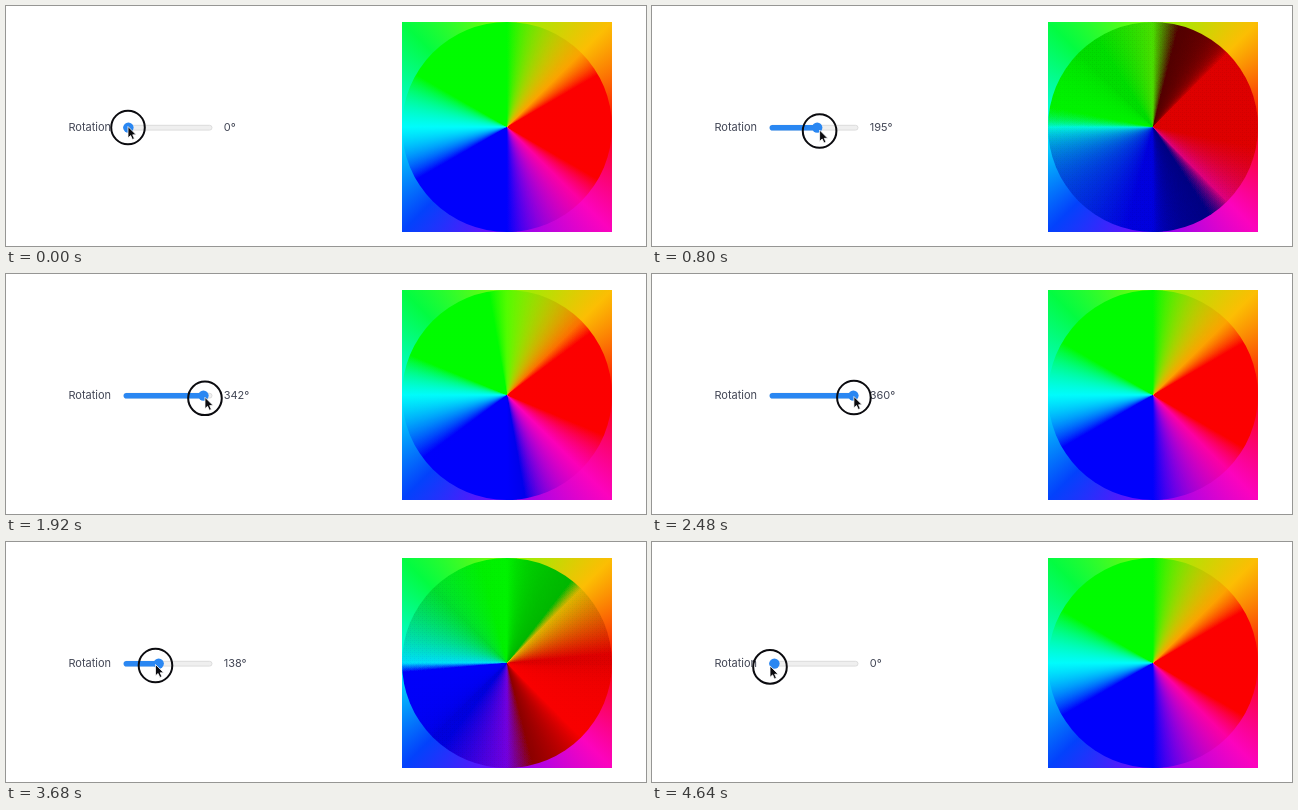
Animation of 640x240 px, one loop 4.72 s. Source, as an HTML page:

```html
<!DOCTYPE html>
<html lang="en">
<head>
<meta charset="utf-8">
<title>Hue rotation slider</title>
<style>
  html, body { margin: 0; width: 100%; height: 100%; overflow: hidden; background: #fff; }
  #panel { position: absolute; left: 0; top: 0; }
  #square { position: absolute; left: 396px; top: 16px; width: 210px; height: 210px; isolation: isolate; }
  #disc { position: absolute; inset: 0; border-radius: 50%; mix-blend-mode: color-burn; }
  text { font: 11px Inter, sans-serif; fill: #434756; }
</style>
</head>
<body>
<svg id="panel" width="640" height="240" viewBox="0 0 640 240">
  <text x="62.4" y="125.3">Rotation</text>
  <text id="value" x="217.7" y="125.3">0°</text>
  <rect x="118" y="119.3" width="88" height="4.8" rx="2.4" fill="#efefef" stroke="#d6d6d6" stroke-width=".8"/>
  <rect id="fill" x="117.6" y="118.9" height="5.6" rx="2.8" fill="#2a87f2"/>
  <circle id="thumb" cy="121.6" r="5.2" fill="#2a87f2"/>
  <g id="pointer">
    <circle r="16.8" fill="none" stroke="#0b0b0f" stroke-width="2"/>
    <path d="M0 -1V10.4L2.6 8L4.4 12L6.4 11.1L4.7 7.3H8.2Z" fill="#0b0b0f" stroke="#fff" stroke-width=".8"/>
  </g>
</svg>
<div id="square"><div id="disc"></div></div>
<script>
const LOOP = 4720, STEP = 80, TURN = 2480;
const el = id => document.getElementById(id);
const clamp = u => Math.min(1, Math.max(0, u));

// Drag out with a quadratic ease-out, then back at nearly constant speed.
function angleAt(t) {
  const out = 1 - (1 - clamp(t / TURN)) ** 2;
  const back = clamp((t - TURN) / 1860) ** 1.1;
  return Math.round(360 * (out - back));
}

// The hand drifts around the thumb: time, dx, dy.
const drift = [
  { t: 0, dx: -0.4, dy: 0 },
  { t: 800, dx: 2.4, dy: 3.5 },
  { t: 1440, dx: 2.4, dy: 3.5 },
  { t: TURN, dx: 0.5, dy: 2 },
  { t: 3360, dx: -2.8, dy: 1.5 },
  { t: LOOP, dx: -4.5, dy: 3.5 }
];

function driftAt(t) {
  const next = drift.findIndex(key => key.t > t);
  const a = drift[next - 1], b = drift[next];
  const mix = key => a[key] + (b[key] - a[key]) * (t - a.t) / (b.t - a.t);
  return { dx: mix("dx"), dy: mix("dy") };
}

// Eight hue steps, anticlockwise from the right edge.
function wheel(shift, saturation) {
  const stops = Array.from({ length: 9 }, (_, i) =>
    `hsl(${(720 - 45 * i + shift) % 360}, ${saturation}%, 50%)`);
  return `conic-gradient(from 90deg, ${stops.join(", ")})`;
}

function draw(now) {
  const t = Math.floor(now % LOOP / STEP) * STEP;
  const angle = angleAt(t);
  const x = 122.4 + 79 * angle / 360;
  const { dx, dy } = driftAt(t);
  el("value").textContent = angle + "°";
  el("thumb").setAttribute("cx", x);
  el("fill").setAttribute("width", x - 117.6);
  el("pointer").setAttribute("transform", `translate(${x + dx} ${121.5 + dy})`);
  // The duller disc keeps every channel above zero, which softens the burn.
  el("disc").style.background = wheel(angle, 82);
}

el("square").style.background = wheel(0, 97.5);
const start = performance.now();
function tick() {
  draw(performance.now() - start);
  requestAnimationFrame(tick);
}
tick();
</script>
</body>
</html>
```
